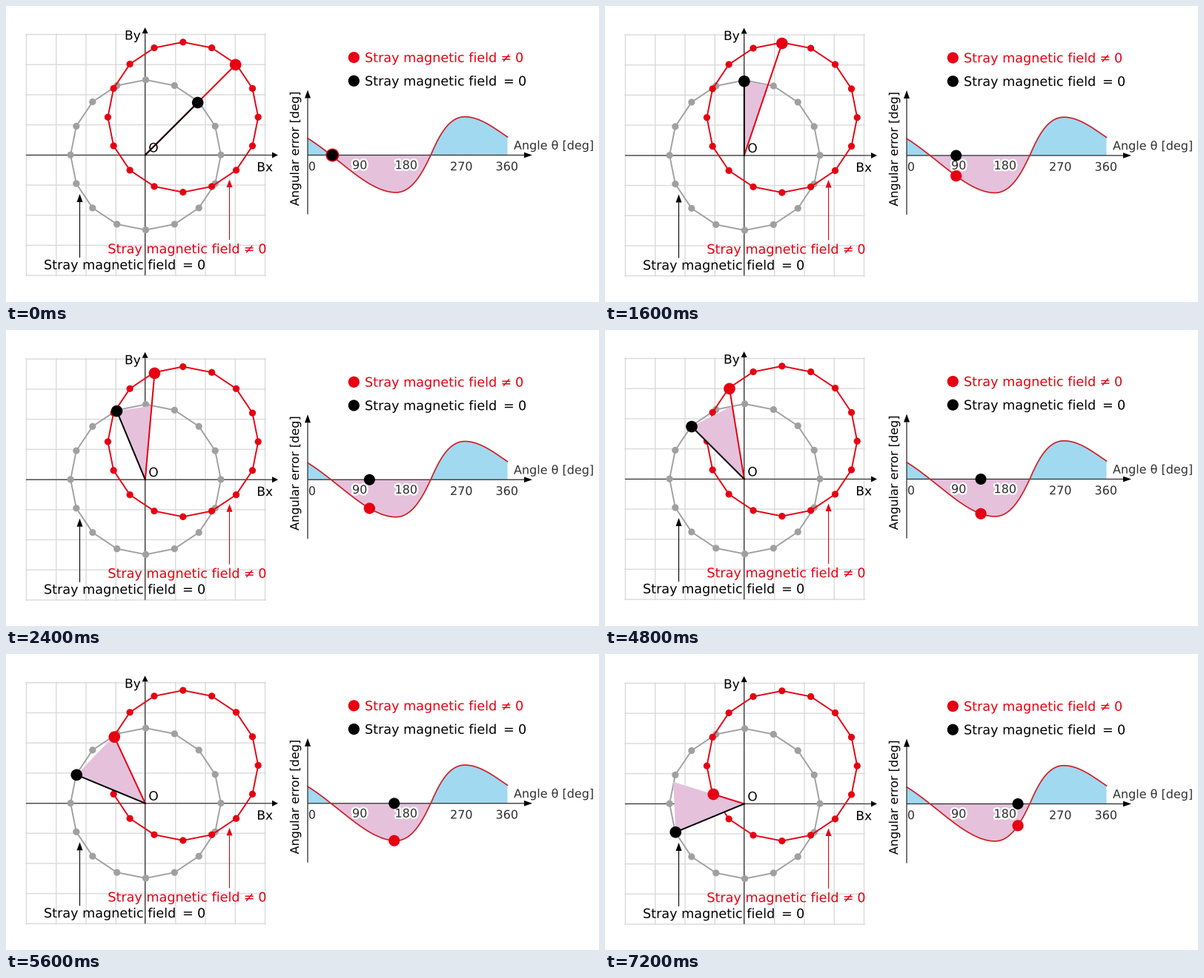
Animation of 800x400 px, one loop 8 s. Source, as a matplotlib script:

```python
import numpy as np
import matplotlib.pyplot as plt
from matplotlib.animation import FuncAnimation
from matplotlib.patches import Circle, PathPatch, Polygon, Rectangle
from matplotlib.path import Path
from matplotlib.textpath import TextPath
from matplotlib.transforms import Affine2D

plt.rcParams["path.snap"] = False

W, H = 800, 400
PX = 0.72  # points per pixel at 100 dpi
RED, BLACK, GRAY, INK = "#e60012", "#000000", "#a0a0a0", "#303030"
PINK, BLUE, PURPLE, CURVE = "#e5c1dc", "#a1d9f0", "#6b4598", "#cf1f26"

ORIGIN = np.array([187.8, 201.4])
RADIUS = 100.2
RING_RADIUS = 101.4
GRAY_CENTER = np.array([188.5, 201.2])
RED_CENTER = np.array([238.8, 150.2])
GRAPH_X, AXIS_Y = 407, 201.5

# One entry per 800 ms: angle, slow vertical drift, callout shown
STEPS = [
    (45, 0, False), (67.5, 0.25, False), (90, 0.5, False),
    (112.5, 0.75, False), (112.5, 1, True), (112.5, 1, True),
    (135, 0, False), (157.5, 0.33, False), (180, 0.67, False),
    (202.5, 1, False),
]

fig = plt.figure(figsize=(W / 100, H / 100), dpi=100, facecolor="white")
ax = fig.add_axes([0, 0, 1, 1])


def polar(center, radius, degrees):
    a = np.radians(degrees)
    return np.stack([center[0] + radius * np.cos(a),
                     center[1] - radius * np.sin(a)], axis=-1)


def bezier(p0, p1, p2, p3):
    t = np.linspace(0, 1, 40)[:, None]
    p0, p1, p2, p3 = map(np.array, (p0, p1, p2, p3))
    return ((1 - t)**3 * p0 + 3 * (1 - t)**2 * t * p1
            + 3 * (1 - t) * t**2 * p2 + t**3 * p3)


ERROR = np.vstack([
    bezier((407, 178.7), (450, 205.5), (488, 251.5), (526, 252)),
    bezier((526, 252), (548, 252), (562, 225), (573, AXIS_Y)),
    bezier((573, AXIS_Y), (584, 176), (597, 149.7), (619, 149.7)),
    bezier((619, 149.7), (640, 149.7), (660, 166), (676.5, 177)),
])


class Layers:
    """Hands out increasing z-orders so that call order is paint order."""
    z = 0

    @classmethod
    def next(cls):
        cls.z += 1
        return cls.z


def line(points, color, width=1.0, **kw):
    x, y = np.transpose(points)
    ax.plot(x, y, color=color, lw=width * PX, zorder=Layers.next(), **kw)


def shape(patch, color):
    patch.set(facecolor=color, edgecolor="none", zorder=Layers.next())
    ax.add_patch(patch)


def dot(center, radius, color):
    shape(Circle(center, radius), color)


def label(x, y, text, size, color=BLACK, font="DejaVu Sans", angle=0, halo=0):
    place = Affine2D().scale(1, -1).rotate_deg(-angle).translate(x, y)
    path = place.transform_path(
        TextPath((0, 0), text, size=size, prop={"family": font}))
    if halo:
        ax.add_patch(PathPatch(path, fc="white", ec="white", lw=halo * PX,
                               joinstyle="round", zorder=Layers.next()))
    shape(PathPatch(path), color)


def arrow(start, tip, color, width=1.2, length=8, half=4, head=None):
    start, tip = np.array(start, float), np.array(tip, float)
    along = (tip - start) / np.hypot(*(tip - start))
    across = along[::-1] * (1, -1)
    base = tip - along * length
    line([start, base], color, width, solid_capstyle="butt")
    shape(Polygon([tip, base + across * half, base - across * half]),
          head or color)


def field_label(x, y, sign, color):
    sign_x, zero_x = (183.5, 203) if sign == "≠" else (187, 207)
    label(x, y, "Stray magnetic field", 17.6, color)
    label(x + sign_x, y, sign, 17.6, color)
    label(x + zero_x, y, "0", 17.6, color)


def ring(center, color):
    points = polar(center, RING_RADIUS, np.arange(0, 361, 22.5))
    line(points, color, 1.9)
    for p in points[:-1]:
        dot(p, 4.6, color)


def draw_vector_plane():
    for i in range(9):
        x, y = 27.5 + 40.25 * i, 38.5 + 40.7 * i
        line([(x, 38), (x, 364.5)], "#dadada", 1.4)
        line([(27, y), (350, y)], "#dadada", 1.4)
    arrow((27, AXIS_Y), (367, AXIS_Y), INK, head=BLACK)
    arrow((187.6, 364), (187.6, 29), INK, head=BLACK)
    ring(GRAY_CENTER, GRAY)
    ring(RED_CENTER, RED)
    label(160, 45.5, "By", 17)
    label(338.3, 223.4, "Bx", 17)
    label(192.3, 197.4, "O", 17)
    arrow((99.5, 340), (99.5, 254), BLACK, 1.1, 11)
    arrow((301.5, 316), (301.5, 234.5), RED, 1.1, 10.5)
    field_label(137.3, 334.2, "≠", RED)
    field_label(51, 355.8, "=", BLACK)


def draw_graph():
    x, y = ERROR.T
    for where, color in ((y > AXIS_Y, PINK), (x < 442, BLUE), (x > 572, BLUE)):
        keep = where & ((color == PINK) | (y <= AXIS_Y + 0.1))
        area = ERROR[keep]
        outline = np.vstack([(area[0, 0], AXIS_Y), area, (area[-1, 0], AXIS_Y)])
        shape(Polygon(outline), color)
    arrow((GRAPH_X, AXIS_Y), (710, AXIS_Y), INK, 1.3, 11, 3.8, BLACK)
    arrow((GRAPH_X, 281.5), (GRAPH_X, 113.5), INK, 1.3, 11, 4, BLACK)
    line(ERROR, CURVE, 1.7)
    label(407.8, 222.2, "0", 16, INK)
    label(467, 220.3, "90", 16, INK, halo=5)
    label(524.5, 220.3, "180", 16, INK, halo=5)
    label(599, 222.2, "270", 16, INK)
    label(660.5, 222.2, "360", 16, INK)
    label(685, 193.8, "Angle θ [deg]", 16, INK)
    label(395, 270.2, "Angular error [deg]", 16.1, BLACK, angle=90)
    for y, sign, color in ((69.5, "≠", RED), (101.2, "=", BLACK)):
        dot((469.3, y), 7.6, color)
        field_label(484, y + 6.3, sign, color)


def draw_callout(point):
    for y in (170, 174):
        line(polar((181, y), 15, np.linspace(50, 130, 20)), PURPLE, 1.6)
    line([(point[0], AXIS_Y + 8), point - (0, 7)], PURPLE, 1.8,
         dashes=(2.6, 1.6), dash_capstyle="butt")
    shape(Polygon([(290, 75), (290, 97), (180, 151)]), PURPLE)
    shape(Polygon([(390, 106), (411, 106), (490, 219)]), PURPLE)
    shape(Rectangle((288.8, 45.3), 139.2, 61.7), PURPLE)
    label(302, 70.8, "Angular Error", 18.1, "white", "Noto Sans CJK JP")
    label(328, 92.8, "(Delay)", 18.1, "white", "Noto Sans CJK JP")


def draw(frame):
    angle, drift, callout = STEPS[frame]
    ax.clear()
    ax.set_axis_off()
    ax.set(xlim=(0, W), ylim=(H - drift, -drift))
    Layers.z = 0
    draw_vector_plane()
    draw_graph()

    black_tip = polar(ORIGIN, RADIUS, angle)
    red_tip = polar(RED_CENTER, RADIUS, angle)
    dx, dy = red_tip - ORIGIN
    red_angle = np.degrees(np.arctan2(-dy, dx)) % 360
    aligned = angle == 45

    if not aligned:
        wedge = [ORIGIN, black_tip, polar(ORIGIN, RADIUS, red_angle)]
        shape(Polygon(wedge), PINK)
    line([ORIGIN, red_tip], RED, 2)
    line([ORIGIN, black_tip], BLACK, 2)
    dot(red_tip, 7.8, RED)
    dot(black_tip, 7.8, BLACK)

    x = GRAPH_X + 0.741 * angle
    point = np.array([x, np.interp(x, *ERROR.T)])
    if aligned:
        point[1] = AXIS_Y
    if callout:
        draw_callout(point)
    dot(point, 9 if aligned else 7.6, RED)
    dot((x, AXIS_Y), 7.5, BLACK)


anim = FuncAnimation(fig, draw, frames=len(STEPS), init_func=lambda: None,
                     interval=800, repeat=True, repeat_delay=0,
                     cache_frame_data=False)
plt.show()
```
